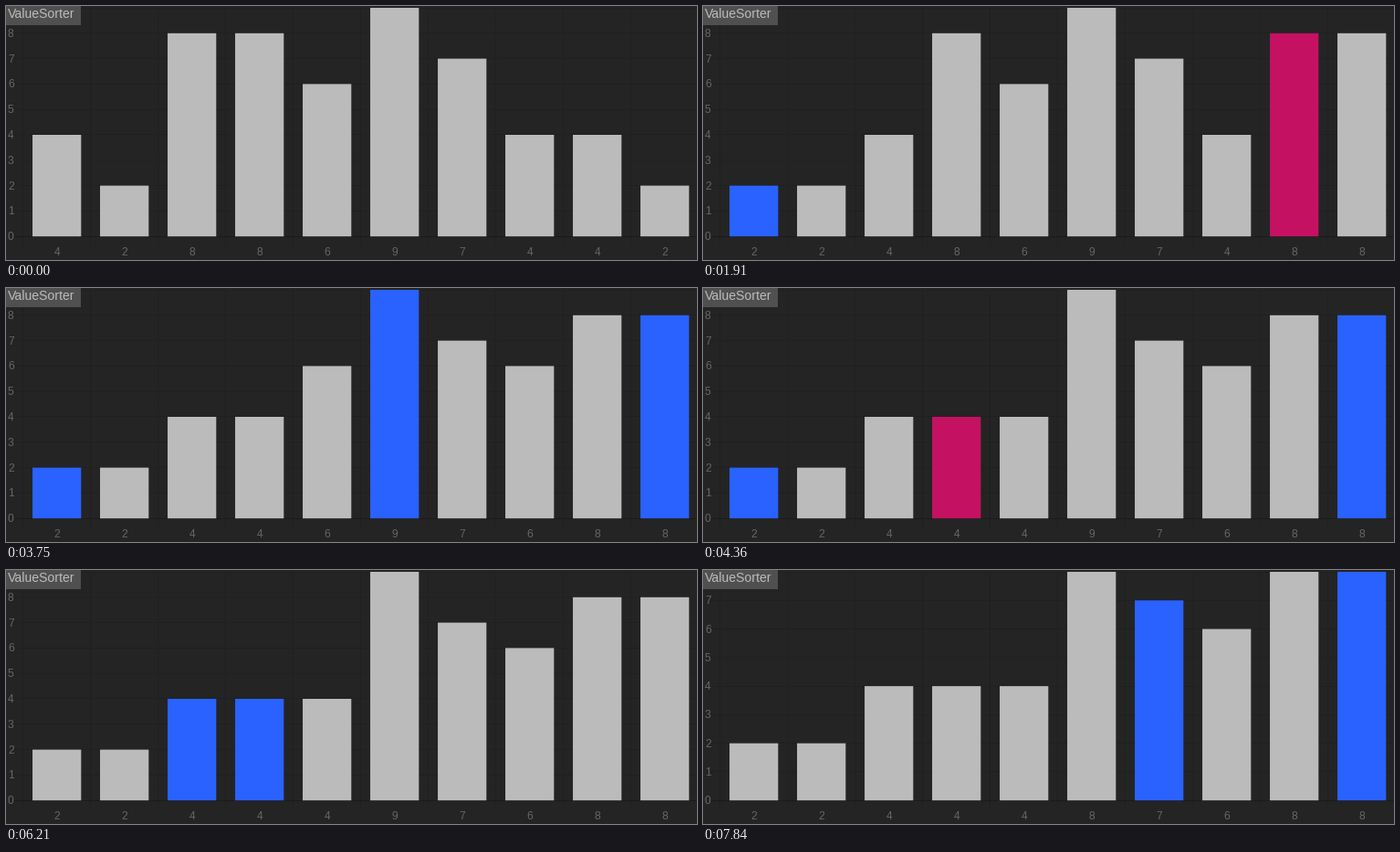
Write a matplotlib script that moves like this. It is 757 by 278 pixels and loops after 8000 ms.

```python
from itertools import islice

import matplotlib.pyplot as plt
from matplotlib.animation import FuncAnimation
from matplotlib.patches import Rectangle

W, H, DPI = 757, 278, 64
PX = 72 / DPI
LOOP, STEP = 8000, 20

LEFT, PITCH, BAR_W = 18.67, 74, 53.28
TOP, BOTTOM = 2.0, 252.2

BACK, GRID, ZERO, TICK = "#242424", "#202020", "#1b1b1b", "#666666"
PLAIN, SELECTED, PATCHED = "#bbbbbb", "#2962ff", "#c51162"
TITLE, TITLE_BACK = "ValueSorter", "#505050"

VALUES = [4, 2, 8, 8, 6, 9, 7, 4, 4, 2]
# Moments (ms) at which the sort moves on by one step
TIMES = [50, 250, 460, 660, 870, 1070, 1270, 1480, 1680, 1910,
         2090, 2290, 2500, 2700, 2910, 3110, 3310, 3520, 3750, 3950,
         4160, 4360, 4540, 4770, 4970, 5180, 5380, 5580, 5800, 6010,
         6210, 6410, 6620, 6820, 7020, 7230, 7430, 7640, 7840]


def quicksort(data):
    """Yield (values, selected, patched) after every visible step."""
    marked = set()

    def state(patched=None):
        return list(data), set(marked), patched

    def look(k):
        marked.add(k)
        yield state()
        marked.discard(k)

    def partition(low, high):
        while high > low:
            i, j, pivot = low, high, data[low]
            while i < j:
                marked.update((low, high))
                yield state()
                while data[j] > pivot:
                    yield from look(j)
                    j -= 1
                data[i] = data[j]
                yield state(i)
                while pivot >= data[i] and i < j:
                    yield from look(i)
                    i += 1
                data[j] = data[i]
                yield state(j)
            marked.clear()
            data[i] = pivot
            yield state(i)
            yield from partition(low, i - 1)
            low = i + 1

    yield state()
    yield from partition(0, len(data) - 1)


states = list(islice(quicksort(list(VALUES)), len(TIMES) + 1))

fig = plt.figure(figsize=(W / DPI, H / DPI), dpi=DPI, facecolor=BACK)
ax = fig.add_axes([0, 0, 1, 1])
ax.set_xlim(0, W)
ax.set_ylim(H, 0)
ax.axis("off")


def line(xs, ys, color=GRID):
    return ax.plot(xs, ys, color=color, lw=PX, snap=False,
                   solid_capstyle="butt", zorder=1)[0]


def label(x, y, text, size, color, **kw):
    return ax.text(x, y, text, fontsize=size * PX, color=color,
                   family="Liberation Sans", va="baseline", **kw)


def crisp(v):
    return round(v - 0.5) + 0.5


def box(x, y, w, h, color, z):
    return ax.add_patch(Rectangle((x, y), w, h, facecolor=color, lw=0,
                                  snap=False, zorder=z))


for k in range(len(VALUES) + 1):
    x = crisp(LEFT + k * PITCH)
    line([x, x], [TOP, BOTTOM + 10])

rows = [line([LEFT - 10, W], [0, 0], GRID if k else ZERO) for k in range(10)]
row_labels = [label(2, 0, str(k), 12, TICK, zorder=2) for k in range(10)]

bars, bar_labels = [], []
for k in range(len(VALUES)):
    mid = LEFT + (k + 0.5) * PITCH
    bars.append(box(mid - BAR_W / 2, BOTTOM, BAR_W, 0, PLAIN, 3))
    bar_labels.append(label(mid, 273, "", 12, TICK, ha="center", zorder=2))

box(0, 0, 82, 21, TITLE_BACK, 5)
label(2, 13, TITLE, 14, PLAIN, zorder=6)


def draw(frame):
    now = frame * STEP + STEP / 2
    values, marked, patched = states[sum(t <= now for t in TIMES)]
    peak = max(values)
    unit = (BOTTOM - TOP) / peak

    for k, (row, text) in enumerate(zip(rows, row_labels)):
        y = BOTTOM - k * unit
        row.set_ydata([crisp(y)] * 2)
        text.set_y(round(y + 4))
        row.set_visible(k <= peak)
        text.set_visible(k <= peak)

    for k, value in enumerate(values):
        bars[k].set_y(BOTTOM - value * unit)
        bars[k].set_height(value * unit)
        bars[k].set_facecolor(PATCHED if k == patched else
                              SELECTED if k in marked else PLAIN)
        bar_labels[k].set_text(str(value))
    return []


anim = FuncAnimation(fig, draw, frames=LOOP // STEP, interval=STEP,
                     init_func=lambda: draw(0), repeat=True, repeat_delay=0,
                     blit=False)
plt.show()
```
